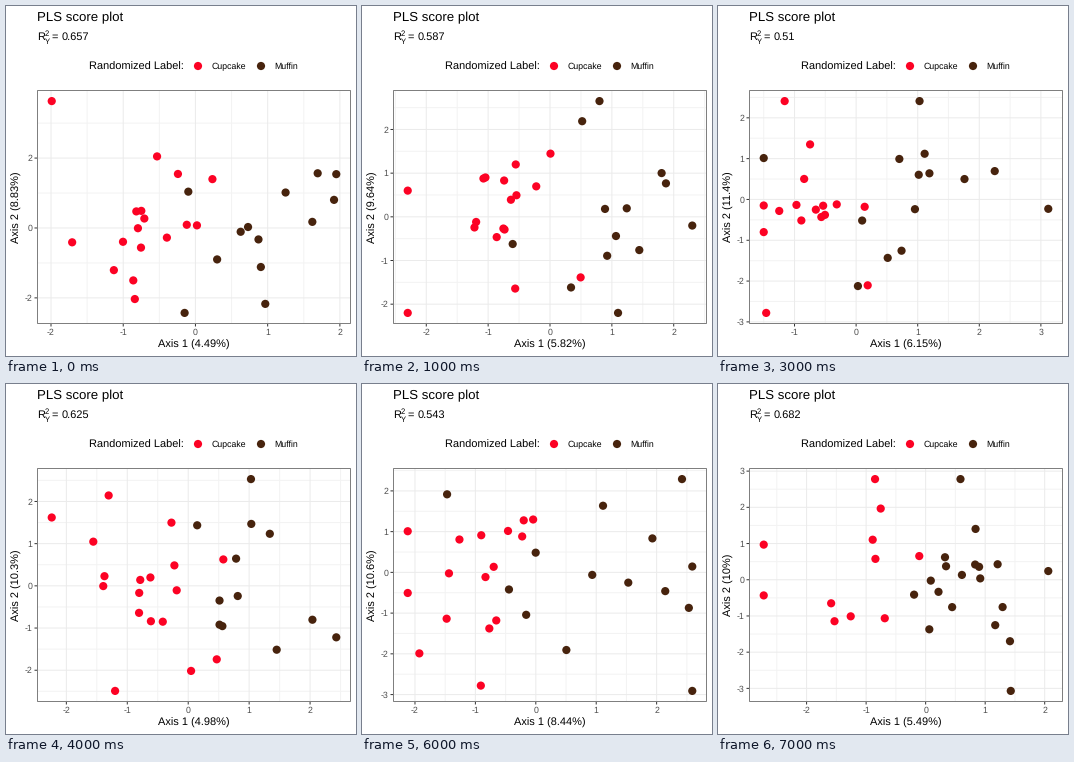
A matplotlib script that plays this animation: 350x350 px, repeating every 8000 ms.

```python
import numpy as np
import matplotlib.pyplot as plt
from matplotlib.animation import FuncAnimation
from matplotlib.patches import Circle, Rectangle

SIZE, DPI = 350, 100
LEFT, RIGHT, TOP, BOTTOM = 31.5, 344.5, 84.5, 317.5
RED, BROWN = "#FC0224", "#47230D"
INK, BORDER, TICK, TICK_TEXT = "black", "#7F7F7F", "#333333", "#4D4D4D"
MAJOR, MINOR = "#EBEBEB", "#F3F3F3"
SAMPLES, SPREAD_Y, EXPAND = 30, 1.05, 0.05

plt.rcParams["font.family"] = "Liberation Sans"
plt.rcParams["text.hinting"] = "none"

scenes = []


def cloud(rng, n, center, spread, low, high):
    """n normal points with exactly the given mean and spread, kept in bounds."""
    z = rng.normal(size=(n, 2))
    z = (z - z.mean(0)) / z.std(0)
    return np.clip(z * (spread, SPREAD_Y) + (center, 0), low, high)


def add_scene(r2, share1, share2, n_red, red, brown, red_far, brown_far):
    """red, brown: (center, spread) on axis 1; *_far: the outermost points."""
    rng = np.random.default_rng(len(scenes))
    far = np.array(red_far + brown_far)
    low, high = far.min(0), far.max(0)
    groups = []
    for n, shape, own in ((n_red, red, red_far),
                          (SAMPLES - n_red, brown, brown_far)):
        inner = cloud(rng, n - len(own), *shape, low, high)
        groups.append(np.vstack([own, inner]))
    scenes.append((r2, share1, share2, low, high, groups))


add_scene("0.657", "4.49", "8.83", 17, (-0.65, 0.46), (0.98, 0.58),
          [(-1.99, 3.63)], [(1.95, 1.54), (-0.15, -2.43)])
add_scene("0.587", "5.82", "9.64", 17, (-0.75, 0.6), (0.95, 0.7),
          [(-2.3, 0.6)], [(0.8, 2.65), (2.3, -0.2), (1.1, -2.2)])
add_scene("0.506", "7", "9.29", 20, (-0.59, 0.82), (0.99, 0.9),
          [(-2.195, 1.02), (-0.59, 2.19)], [(2.42, 2.87), (3.08, -2.24)])
add_scene("0.51", "6.15", "11.4", 16, (-0.7, 0.49), (0.72, 0.95),
          [(-1.46, -2.78), (-1.5, -0.8)], [(1.03, 2.41), (3.12, -0.23)])
add_scene("0.625", "4.98", "10.3", 18, (-0.58, 0.62), (0.92, 0.53),
          [(-2.24, 1.62), (-1.2, -2.49)], [(1.03, 2.53), (2.43, -1.22)])
add_scene("0.572", "6.37", "10.1", 16, (-0.8, 0.65), (0.9, 0.8),
          [(-2.1, 0.9), (-0.9, -2.6)], [(1.4, 2.4), (2.6, -0.6)])
add_scene("0.543", "8.44", "10.6", 16, (-0.96, 0.68), (0.95, 1.25),
          [(-2.12, 1.01), (-0.91, -2.78)], [(2.42, 2.29), (2.59, -2.91)])
add_scene("0.682", "5.49", "10", 11, (-1.17, 0.74), (0.65, 0.46),
          [(-0.85, 2.78), (-2.72, 0.97)], [(2.06, 0.24), (1.43, -3.07)])

fig = plt.figure(figsize=(SIZE / DPI, SIZE / DPI), dpi=DPI, facecolor="white")
ax = fig.add_axes([0, 0, 1, 1])


def px(n):
    return n * 72 / DPI


def text(x, y, s, size=11, color=INK, ha="left", angle=0):
    ax.text(x, y, s, fontsize=px(size), color=color, ha=ha, va="baseline",
            rotation=angle, rotation_mode="anchor")


def line(x0, y0, x1, y1, color, z):
    ax.plot([x0, x1], [y0, y1], color=color, lw=px(1), zorder=z,
            solid_capstyle="butt", snap=False)


def dot(x, y, color):
    ax.add_patch(Circle((x, y), 4.1, fc=color, ec="none", zorder=4))


def scale(low, high, start, end):
    """Map data to pixels with a small margin at both ends of the panel."""
    margin = (high - low) * EXPAND
    unit = (end - start) / (high - low + 2 * margin)
    return lambda v: start + (v - low + margin) * unit


def ticks(low, high, to_px, start, end):
    """Yield (pixel, value, is_major) for every half step inside the panel."""
    step = 2 if high - low > 6 else 1
    for k in range(-8, 9):
        value = k * step / 2
        pos = to_px(value)
        if start < pos < end:
            yield pos, value, k % 2 == 0


def draw_x_axis(low, high, to_px):
    for x, value, major in ticks(low, high, to_px, LEFT, RIGHT):
        line(x, TOP, x, BOTTOM, MAJOR if major else MINOR, 2 if major else 1)
        if major:
            line(x, BOTTOM, x, BOTTOM + 3, TICK, 3)
            text(x, 329, f"{value:g}", 8.8, TICK_TEXT, "center")


def draw_y_axis(low, high, to_px):
    for y, value, major in ticks(low, high, to_px, TOP, BOTTOM):
        line(LEFT, y, RIGHT, y, MAJOR if major else MINOR, 2 if major else 1)
        if major:
            line(LEFT - 3, y, LEFT, y, TICK, 3)
            text(26.5, y + 3.1, f"{value:g}", 8.8, TICK_TEXT, "right")


def draw_header(r2):
    text(31, 15, "PLS score plot", 13.2)
    text(31, 34, "R")
    text(39, 30, "2", 7.7)
    text(39, 38, "Y", 7.7)
    text(45.8, 34, "=")
    text(55.7, 34, r2)
    text(83, 64, "Randomized Label:")
    dot(192, 60, RED)
    text(206, 63, "Cupcake", 8.8)
    dot(255, 60, BROWN)
    text(268.7, 63, "Muffin", 8.8)


def draw(i):
    r2, share1, share2, low, high, groups = scenes[i]
    to_x = scale(low[0], high[0], LEFT, RIGHT)
    to_y = scale(low[1], high[1], BOTTOM, TOP)
    ax.clear()
    ax.set_xlim(0, SIZE)
    ax.set_ylim(SIZE, 0)
    ax.axis("off")
    draw_header(r2)
    draw_x_axis(low[0], high[0], to_x)
    draw_y_axis(low[1], high[1], to_y)
    for color, points in zip((RED, BROWN), groups):
        for x, y in points:
            dot(to_x(x), to_y(y), color)
    ax.add_patch(Rectangle((LEFT, TOP), RIGHT - LEFT, BOTTOM - TOP, fill=False,
                           ec=BORDER, lw=px(1), zorder=5, snap=False))
    text(188, 342, f"Axis 1 ({share1}%)", ha="center")
    text(13.3, 201, f"Axis 2 ({share2}%)", ha="center", angle=90)
    return []


anim = FuncAnimation(fig, draw, frames=len(scenes), interval=1000,
                     init_func=lambda: [], repeat=True, repeat_delay=0)
plt.show()
```
